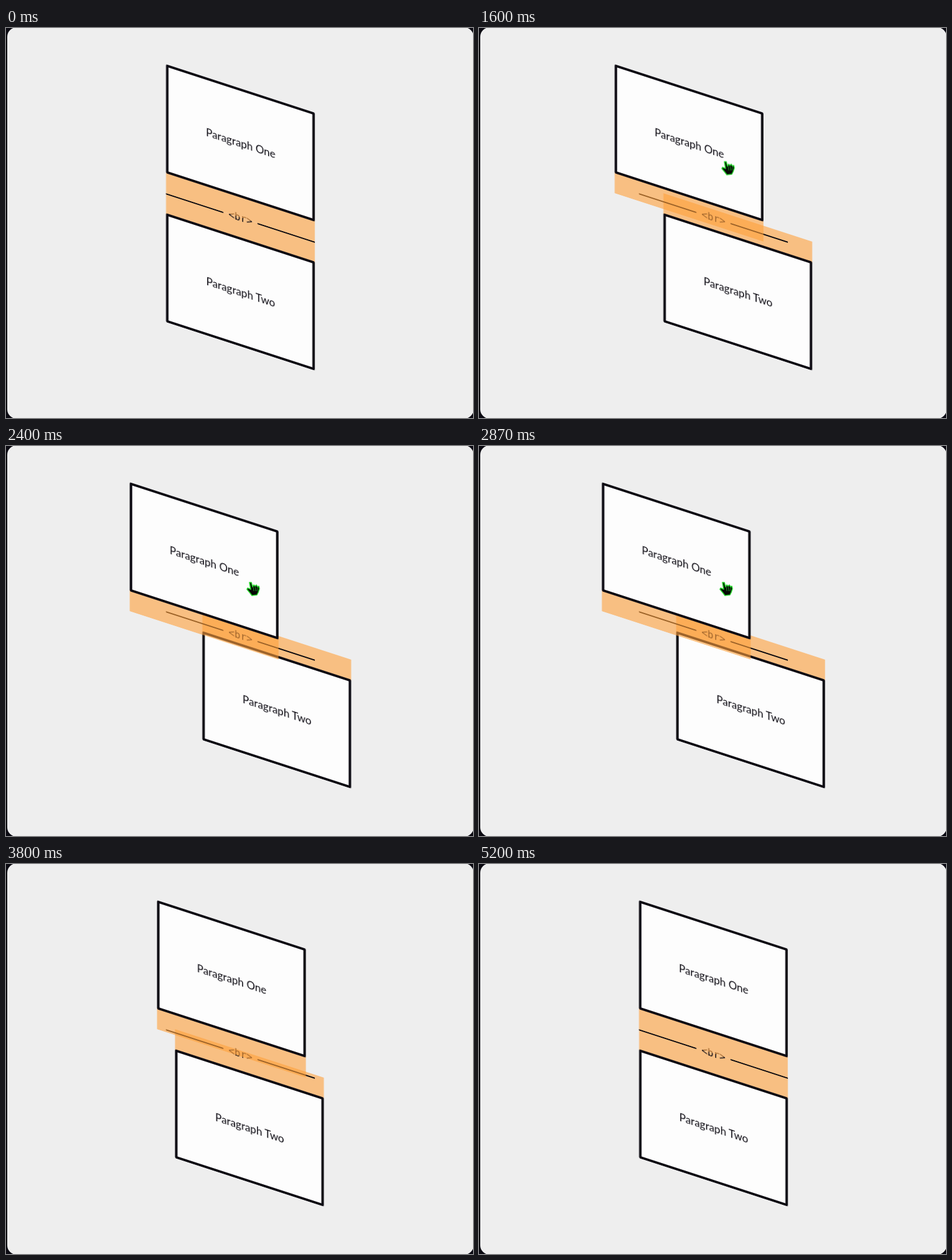
Recreate the animation shown at these times as an HTML page. Size 750 px wide and 626 px high, loop 5270 ms.

```html
<!DOCTYPE html>
<html lang="en">
<head>
<meta charset="utf-8">
<title>Line break between paragraphs</title>
<style>
  html, body { margin: 0; width: 100%; height: 100%; overflow: hidden; background: #0b0a12; }
  svg { display: block; width: 100%; height: 100%; }

  .card { fill: #eee; }
  .panel { fill: #fdfdfd; stroke: #0c0a12; stroke-width: 4; stroke-linejoin: round; }
  .band { fill: rgb(255 160 59 / .6); }
  .rule { stroke: #08070c; stroke-width: 2; }
  text { fill: #0c0a12; text-anchor: middle; font: 17px Lato, sans-serif; }
  .tag { font: 16px "DejaVu Sans Mono", monospace; }

  .hand { fill: #050805; stroke: #25d32b; stroke-width: 1.6; stroke-linejoin: round; }
  .fingers { fill: none; stroke: #22b928; stroke-width: .8; }

  .slide {
    animation: out 2.5s 1.223s cubic-bezier(.19, 1, .22, 1) both paused,
               back 2.5s 3.31s cubic-bezier(.19, 1, .22, 1) both paused;
  }
  .upper { --d: -60px; }
  .lower { --d: 60px; }
  .cursor { animation: point 5.27s linear both paused; }

  @keyframes out { from { translate: 0 } to { translate: var(--d) } }
  @keyframes back {
    from { transform: translateX(0) }
    to { transform: translateX(calc(-1 * var(--d))) }
  }
  @keyframes point {
    0%, 21% { transform: translate(775px, 148px); animation-timing-function: cubic-bezier(.1, .6, .3, 1) }
    25.3% { transform: translate(431px, 180px); animation-timing-function: ease-out }
    32%, 62.2% { transform: translate(397px, 229px) }
    63%, 100% { transform: translate(775px, 229px) }
  }
</style>
</head>
<body>
<svg viewBox="0 0 750 626">
  <rect class="card" x="2" y="-1" width="749" height="628" rx="15"/>

  <g class="slide lower">
    <g transform="translate(376.5 0) skewY(18)">
      <rect class="band" x="-119.5" y="304" width="239" height="34"/>
      <rect class="panel" x="-117.5" y="338" width="235" height="171"/>
      <text x=".4" y="430">Paragraph Two</text>
    </g>
  </g>

  <g transform="translate(376.5 0) skewY(18)">
    <path class="rule" d="M-119.5 305h92M27.5 305h92"/>
    <text class="tag" y="310.5">&lt;br&gt;</text>
  </g>

  <g class="slide upper">
    <g transform="translate(376.5 0) skewY(18)">
      <rect class="band" x="-119.5" y="270" width="239" height="34"/>
      <rect class="panel" x="-117.5" y="99" width="235" height="171"/>
      <text x=".4" y="191">Paragraph One</text>
    </g>
  </g>

  <g class="cursor">
    <path class="hand" d="M-6-10L-3-10L-1-3L1-6L3-4L5-6L7-3L9-4L10 0L8 6L6 10L-2 11L-5 7L-10 1L-9-1L-4 1Z"/>
    <path class="fingers" d="M0-3L1 4M3-4L4 4M7-3L6 4"/>
  </g>
</svg>
<script>
  const LOOP = 5270, STEP = 1000 / 15;
  const animations = document.getAnimations();
  const start = performance.now();

  // The motion advances at 15 pictures per second.
  function draw() {
    const t = (performance.now() - start) % LOOP;
    const time = Math.floor((t + 4) / STEP) * STEP;
    for (const a of animations) a.currentTime = time;
    requestAnimationFrame(draw);
  }
  draw();
</script>
</body>
</html>
```
